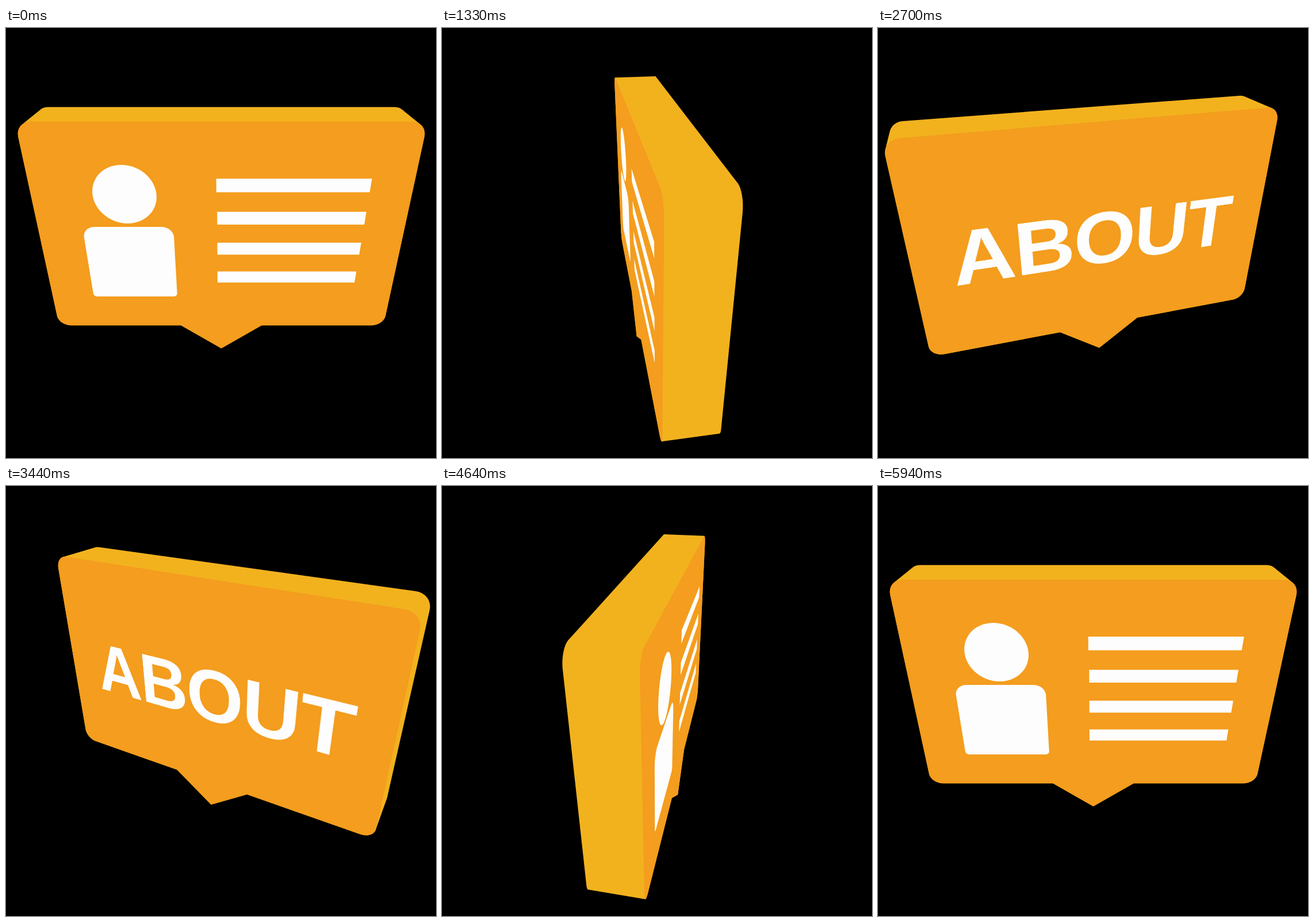
These frames come from a looping animation (748x748 px, 5970 ms). An HTML page:

```html
<!DOCTYPE html>
<html lang="en">
<head>
<meta charset="utf-8">
<title>Rotating bubble</title>
<style>
  html, body { margin: 0; width: 100%; height: 100%; overflow: hidden; background: #000; }
  svg { position: absolute; left: 0; top: 0; display: block; }
  #label { transform-origin: 0 0; overflow: visible; }
  #label text { font: bold 200px "Liberation Sans", Arial, sans-serif; letter-spacing: -3px; fill: #fdfdfd; }
</style>
</head>
<body>
<svg width="748" height="748" viewBox="0 0 748 748">
  <path id="wall" fill="#f2b21e"/>
  <path id="face" fill="#f49d1e"/>
  <path id="card" fill="#fdfdfd"/>
</svg>
<svg id="label" width="800" height="200" viewBox="0 0 800 200">
  <text x="400" y="168.8" text-anchor="middle">ABOUT</text>
</svg>
<script>
const LOOP = 5970, STEP = 33.35, LAST = 178;
const FOCAL = 839, CENTER = { x: 374.5, y: 374 };
const TILT = { sin: 0.503, cos: 0.8643 };
const HALF_DEPTH = 0.137, HEIGHT = 1.2677, CORNER = 0.075;
const TEXT_SCALE = 0.00231, TEXT_Y = 0.657;

const $ = id => document.getElementById(id);

// Quarter turn of a rounded corner, clockwise on screen.
function arc(cx, cy, r, quarter, n = 8) {
  return Array.from({ length: n + 1 }, (_, i) => {
    const a = (quarter + i / n) * Math.PI / 2;
    return [cx + r * Math.cos(a), cy + r * Math.sin(a)];
  });
}

function roundedBox(x0, y0, x1, y1, top, bottom, base = []) {
  return [
    ...arc(x0 + top, y0 + top, top, 2),
    ...arc(x1 - top, y0 + top, top, 3),
    ...arc(x1 - bottom, y1 - bottom, bottom, 0),
    ...base,
    ...arc(x0 + bottom, y1 - bottom, bottom, 1)
  ];
}

const bubble = roundedBox(-1, 0, 1, HEIGHT, CORNER, CORNER,
  [[0.2487, HEIGHT], [0, HEIGHT + 0.188], [-0.2487, HEIGHT]]);

const head = [0, 1, 2, 3].flatMap(q => arc(-0.508, 0.389, 0.168, q, 14));
const torso = roundedBox(-0.757, 0.5785, -0.261, 1.047, 0.065, 0.022);
const bars = [0, 1, 2, 3].map(i => {
  const y = 0.296 + i * 0.1912, left = i ? -0.022 : -0.026;
  return [[left, y], [0.777, y], [0.777, y + 0.077], [left, y + 0.077]];
});
const cardShapes = [head, torso, ...bars];

// Homogeneous screen position; y runs down from the top of the bubble.
function homogeneous(x, y, z, angle) {
  const s = Math.sin(angle), c = Math.cos(angle);
  const side = x * c - z * s, near = x * s + z * c;
  const depth = 2.4554 + y * TILT.sin - near * TILT.cos;
  const up = 0.6566 - y * TILT.cos - near * TILT.sin;
  return [CENTER.x * depth + FOCAL * side, CENTER.y * depth - FOCAL * up, depth];
}

function project(points, z, angle) {
  return points.map(([x, y]) => {
    const [a, b, w] = homogeneous(x, y, z, angle);
    return [a / w, b / w];
  });
}

function area(points) {
  return points.reduce((sum, [x, y], i) => {
    const [nx, ny] = points[(i + 1) % points.length];
    return sum + x * ny - nx * y;
  }, 0);
}

const outline = points =>
  "M" + points.map(p => p.map(v => v.toFixed(2)).join(" ")).join("L") + "Z";

function labelMatrix(angle) {
  const at = (u, v) => homogeneous((u - 400) * TEXT_SCALE,
    TEXT_Y + (v - 100) * TEXT_SCALE, HALF_DEPTH, angle);
  const o = at(0, 0);
  const du = at(1, 0).map((v, i) => (v - o[i]) / o[2]);
  const dv = at(0, 1).map((v, i) => (v - o[i]) / o[2]);
  const m = [du[0], du[1], 0, du[2], dv[0], dv[1], 0, dv[2],
    0, 0, 1, 0, o[0] / o[2], o[1] / o[2], 0, 1];
  return `matrix3d(${m.map(v => v.toFixed(9)).join(",")})`;
}

function render(time) {
  const tick = Math.min(LAST, Math.floor((time % LOOP + 5) / STEP));
  const turn = 2 * Math.PI * tick / LAST;
  const reversed = Math.cos(turn) < 0;
  // The solid looks the same after half a turn, so only the near side is drawn.
  const angle = reversed ? turn - Math.PI : turn;

  const front = project(bubble, HALF_DEPTH, angle);
  const back = project(bubble, -HALF_DEPTH, angle);
  const facing = area(front) > 0;
  const walls = front.map((p, i) => {
    const j = (i + 1) % front.length;
    return [p, front[j], back[j], back[i]];
  }).filter(quad => area(quad) < 0);
  // The walls continue under the face, so no dark seam shows between them.
  if (facing) walls.push([...front].reverse());

  $("wall").setAttribute("d", walls.map(outline).join(""));
  $("face").setAttribute("d", facing ? outline(front) : "");
  $("card").setAttribute("d", facing && !reversed
    ? cardShapes.map(s => outline(project(s, HALF_DEPTH, angle))).join("") : "");

  const label = $("label");
  label.style.visibility = facing && reversed ? "visible" : "hidden";
  label.style.transform = labelMatrix(angle);
}

const start = performance.now();
function loop() {
  render(performance.now() - start);
  requestAnimationFrame(loop);
}
loop();
</script>
</body>
</html>
```
